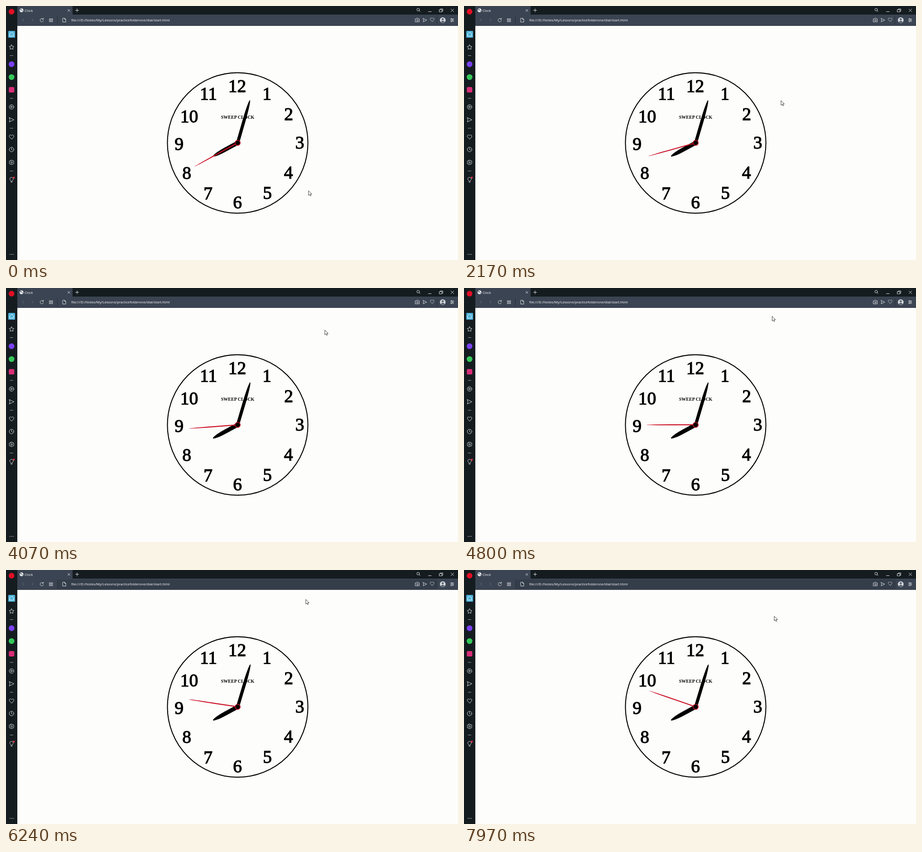
These frames come from a looping animation (998 by 561 pixels, 8000 ms). An HTML page:

```html
<!DOCTYPE html>
<html lang="en">
<head>
<meta charset="utf-8">
<title>Clock</title>
<style>
html, body { margin: 0; width: 100%; height: 100%; overflow: hidden; background: #fdfdfc; }
svg { display: block; width: 998px; height: 561px; }
.ui { font-family: "Open Sans", "Noto Sans", sans-serif; font-weight: 500; fill: #fff; }
.dial { font-family: "Liberation Serif", "Times New Roman", serif; text-anchor: middle; }
#numbers { font-size: 39.5px; stroke: #000; stroke-width: 1.3; }
.icons { fill: none; stroke: #d8dbdf; stroke-width: 1; stroke-linecap: round; stroke-linejoin: round; }
</style>
</head>
<body>
<svg viewBox="0 0 998 561">
  <!-- browser window -->
  <rect width="998" height="561" fill="#fdfdfc"/>
  <path d="M0 0H998V20H25V561H0Z" fill="#151c20"/>
  <path d="M25 0H147V19H998V43H25Z" fill="#3b4452"/>
  <rect id="field" x="113" y="21" width="838" height="21" fill="#2c343f"/>
  <path d="M25 43.3H998" stroke="#20262e"/>

  <!-- app shortcuts -->
  <circle cx="12.3" cy="12.5" r="6.2" fill="#e30f25"/>
  <rect x="5" y="55" width="15" height="15" rx="1.5" fill="#51b4da"/>
  <circle cx="12.3" cy="128.5" r="6.3" fill="#7a41f5"/>
  <circle cx="12.3" cy="157" r="6.3" fill="#35c759"/>
  <rect x="6.3" y="179" width="12" height="12" rx="2.5" fill="#d92d77"/>

  <g class="icons">
    <path d="M8.3 61.2L12.5 57.8L16.7 61.2V66.4H8.3Z" stroke="#e8f8ff"/>
    <path d="M12.3 85.6L14 88.9L17.5 89.5L15 92L15.6 95.6L12.3 94.3L9 95.6L9.6 92L7.1 89.5L10.6 88.9Z"/>
    <path d="M9 109.5H15.5M9 204H15.5M9 270H15.5M9 364.5H15.5" stroke="#a1a7ac"/>
    <circle cx="12.3" cy="223" r="5"/>
    <path d="M10.8 220.8V225.2L14.8 223Z"/>
    <path d="M7.3 246.5L17.5 251.3L7.3 256.2L8.7 251.3Z"/>
    <path id="heart" d="M12.3 294L8 289.6C5.5 286.5 9.5 282.5 12.3 286.2C15.1 282.5 19.1 286.5 16.6 289.6Z"/>
    <circle cx="12.3" cy="317" r="5"/>
    <path d="M12.3 313.8V317L14.3 318.5"/>
    <path d="M10.8 340.5H13.8L14.5 342L16.5 341.8L17.6 344L16.5 345.4L17.5 347L16 349.2L14.3 348.7L13.4 350.3H11L10.2 348.7L8.3 349L7 346.7L8.2 345.2L7 343.7L8.4 341.6L10.2 342Z"/>
    <circle cx="12.3" cy="345.4" r="1.7"/>
    <path d="M10.7 387V385.6C6.5 383 8.4 378.5 12.3 378.5S18 383 13.9 385.6V387ZM11 389.3H13.6"/>
    <path d="M9 548.5H9.02M12.5 548.5H12.52M16 548.5H16.02" stroke-width="1.7"/>

    <!-- tab strip and toolbar -->
    <path d="M136.5 7.5L141 12M141 7.5L136.5 12M157 6V13M153.5 9.5H160.5"/>
    <circle cx="910" cy="8" r="2.9"/>
    <path d="M912.3 10.3L914.5 12.5M932.5 12.5H939M982.5 6.5L988.5 12.5M988.5 6.5L982.5 12.5M957 8H962.5V13H957ZM959 8V6.5H964.5V11.5H962.5"/>
    <path d="M39 28L36 31L39 34M57 28L60 31L57 34" stroke="#68717e"/>
    <path d="M82 29A3.7 3.7 0 1 0 82.7 32M82.5 26.8V29.3H80"/>
    <path d="M96 28H98.5V30.5H96ZM100.500 28H103V30.5H100.5ZM96 32.3H98.5V34.8H96ZM100.5 32.3H103V34.8H100.5Z" stroke-width=".9"/>
    <path d="M125.5 27H129.5L132 29.5V35.5H125.5ZM129.5 27V29.5H132"/>
    <path d="M113.5 23V40M951.5 23V40" stroke="#272e38"/>
    <path d="M904 28.5H906L907 27H910L911 28.5H912.5V35H904Z"/>
    <circle cx="908.3" cy="31.6" r="1.7"/>
    <path d="M921 27.5L929 31.2L921 35L922.2 31.2Z"/>
    <use href="#heart" transform="translate(930.6 -212.7) scale(.84)"/>
    <path d="M981.5 28.5H988.5M981.5 31.2H988.5M981.5 34H988.5"/>
    <path d="M984 27.8V29.2M986.5 30.5V32M983.5 33.3V34.7" stroke-width="1.4"/>
  </g>
  <circle cx="17.3" cy="379" r="2" fill="#f5303b"/>
  <circle cx="34.3" cy="9.5" r="4.3" fill="#eef0f2"/>
  <path d="M31 8L33 6.5L35 8L33.5 10ZM35 10.5L37.5 9L36.5 12Z" fill="#4d5664"/>
  <circle cx="964.3" cy="31.2" r="6.3" fill="#d3d8de"/>
  <path d="M959.8 35.5Q964.3 29.5 968.8 35.5Q964.3 39 959.8 35.5Z" fill="#59626f"/>
  <circle cx="964.3" cy="29.3" r="2.3" fill="#59626f"/>
  <text class="ui" x="41" y="12.6" font-size="7.4">Clock</text>
  <text class="ui" x="144" y="33.9" font-size="7.7">file:///D:/Notes/My/Lessons/practicefolderone/dial/start.html</text>

  <!-- clock -->
  <circle cx="511.5" cy="302.5" r="155.1" fill="none" stroke="#000" stroke-width="2.1"/>
  <g class="dial" id="numbers"></g>
  <text class="dial" x="511.6" y="249.3" font-size="10" font-weight="bold">SWEEP CLOCK</text>
  <g id="hands"></g>
  <circle cx="511.5" cy="302.2" r="5.7" stroke="#cb1024" stroke-width="1.5"/>

  <g id="cursor">
    <path id="arrow" d="M0 0V10.3L2.4 8.1L4 11.6L5.7 10.9L4.2 7.4H7.3Z" fill="#fff" stroke="#111" stroke-width=".8"/>
    <path id="beam" d="M-2 -5H2M0 -5V5M-2 5H2" fill="none" stroke="#0b0e12"/>
  </g>
</svg>
<script>
const $ = id => document.getElementById(id);

function add(parent, tag, attrs, text = '') {
  const el = document.createElementNS('http://www.w3.org/2000/svg', tag);
  for (const key in attrs) el.setAttribute(key, attrs[key]);
  el.textContent = text;
  return parent.appendChild(el);
}

// Centre and baseline of the numerals 1 to 12
[[576, 207], [624, 252], [648.5, 315], [623.5, 381], [577, 426], [511, 447],
 [446, 427], [399, 381.5], [382, 317.5], [404.5, 257], [447, 207], [510.5, 189.5]]
  .forEach(([x, y], i) => add($('numbers'), 'text', { x, y }, i + 1));

// Straight sides, then a half ellipse over the outer half
function makeHand(width, length, fill) {
  const r = width / 2, h = length / 2;
  return add($('hands'), 'path', { fill, d: `M${-r} 0V${-h}A${r} ${h} 0 0 1 ${r} ${-h}V0Z` });
}
const hourHand = makeHand(9, 62, '#000');
const minuteHand = makeHand(7, 98, '#000');
const secondHand = makeHand(2.2, 108.5, '#cb1024');
const turn = (hand, angle) =>
  hand.setAttribute('transform', `translate(511.5 302.2) rotate(${angle})`);

// Pointer path: time, x, y
const path = [[0, 668, 408], [800, 641, 408.5], [2170, 700, 209], [4070, 704, 93],
  [5340, 663, 40], [7040, 661, 87], [7970, 685, 102], [8000, 685, 102]];

function pointerAt(t) {
  const i = path.findIndex(p => p[0] > t);
  const [t0, x0, y0] = path[i - 1], [t1, x1, y1] = path[i];
  const k = (t - t0) / (t1 - t0);
  return [x0 + (x1 - x0) * k, y0 + (y1 - y0) * k];
}

function draw() {
  const t = performance.now() % 8000;
  const seconds = 8 * 3600 + 2 * 60 + 40.2 + t / 1000;
  turn(hourHand, seconds / 120);
  turn(minuteHand, seconds / 10);
  turn(secondHand, seconds * 6 % 360);

  const [x, y] = pointerAt(t);
  const overAddress = y < 43;
  $('cursor').setAttribute('transform', `translate(${x} ${y})`);
  $('arrow').style.display = overAddress ? 'none' : '';
  $('beam').style.display = overAddress ? '' : 'none';
  // The address field darkens under the pointer and stays slightly tinted
  $('field').style.opacity = overAddress ? 1 : t > 5340 ? .4 : 0;
  requestAnimationFrame(draw);
}
draw();
</script>
</body>
</html>
```
